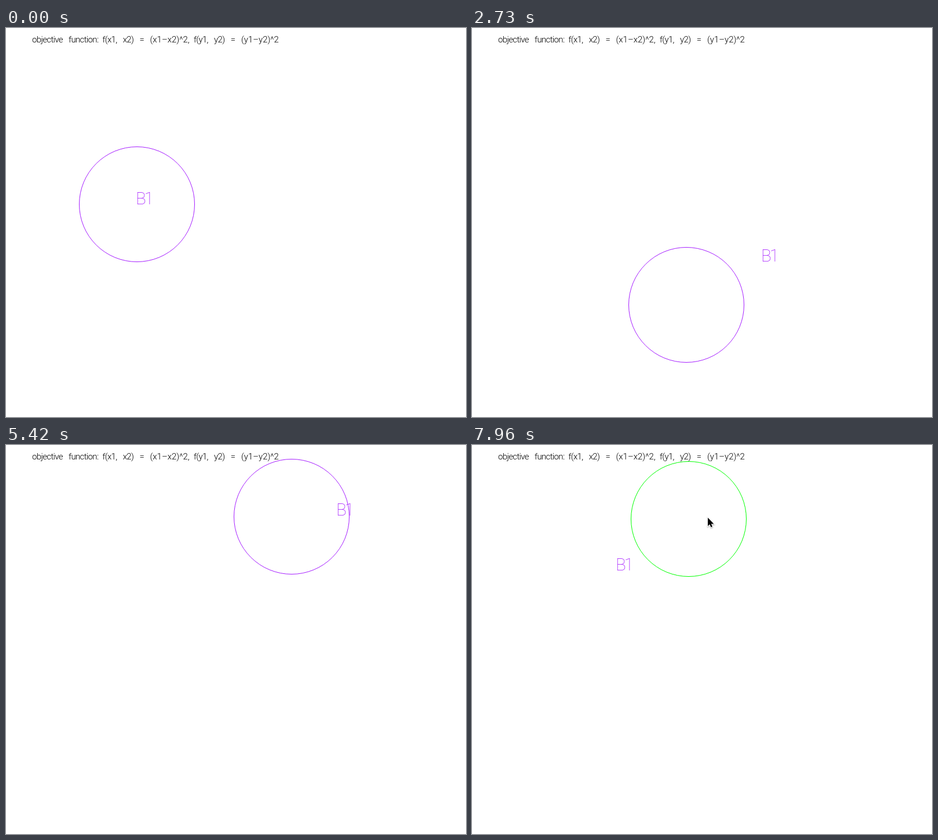
These frames come from a looping animation (794 px wide and 673 px high, 7.99 s). An HTML page with a canvas:

```html
<!DOCTYPE html>
<html lang="en">
<head>
<meta charset="utf-8">
<title>Objective function</title>
<style>
html, body { margin: 0; width: 100%; height: 100%; overflow: hidden; background: #fff; }
canvas { display: block; }
</style>
</head>
<body>
<canvas id="stage" width="794" height="673"></canvas>
<script>
const ctx = document.getElementById('stage').getContext('2d');
const LOOP = 7990, RADIUS = 99.5;
const LAG = 150; // the follower closes the gap to its leader at rate 1 / LAG
const GRAB = 6330, CURSOR_IN = 6180;
const PURPLE = '#a61eff', GREEN = '#00ff00';

// Waypoints of the follower as [time, x, y]: first the ball, after GRAB the label
const path = [
  [500, 226, 305], [700, 190, 372], [900, 142, 370], [1150, 150, 150],
  [1350, 235, -20], [1600, 539, 10], [1850, 585, 174], [2100, 583, 95],
  [2380, 310, 440], [2580, 252, 540], [2730, 369, 479], [2900, 529, 382],
  [3250, 690, 260], [3650, 740, 430], [3920, 725, 338], [4150, 673, 257],
  [4450, 415, 565], [4680, 403, 510], [4770, 440, 409], [4870, 460, 288],
  [5080, 455, 165], [5390, 480, 125], [5650, 640, 150], [5900, 600, 290],
  [6240, 462, 321], [GRAB, 462, 321], [6700, 430, 332], [7030, 355, 345],
  [7400, 225, 315], [7700, 195, 262], [7960, 249, 218], [8060, 458, 71]
];

// Velocity at a waypoint; zero next to a rest
function slope(i, axis) {
  const p = path[i], a = path[i - 1], b = path[i + 1];
  if (!a || !b || a[axis] === p[axis] || b[axis] === p[axis]) return 0;
  return (b[axis] - a[axis]) / (b[0] - a[0]);
}

// Follower from a cubic Hermite curve; leader = follower + LAG * velocity
function chase(t) {
  const i = Math.max(path.findIndex(p => p[0] > t) - 1, 0);
  const [p, q] = [path[i], path[i + 1]];
  const span = q[0] - p[0];
  const u = Math.max((t - p[0]) / span, 0), u2 = u * u, u3 = u2 * u;
  const follower = [], leader = [];
  for (const axis of [1, 2]) {
    const m = span * slope(i, axis), n = span * slope(i + 1, axis);
    const d = q[axis] - p[axis];
    const pos = p[axis] + d * (3 * u2 - 2 * u3) + m * (u3 - 2 * u2 + u) + n * (u3 - u2);
    const vel = (6 * d * (u - u2) + m * (3 * u2 - 4 * u + 1) + n * (3 * u2 - 2 * u)) / span;
    follower.push(pos);
    leader.push(pos + LAG * vel);
  }
  return { follower, leader };
}

function write(text, x, y, font, color, letter, word = 0) {
  ctx.font = font + ' Roboto, Lato, sans-serif';
  ctx.letterSpacing = letter + 'px';
  ctx.wordSpacing = word + 'px';
  ctx.fillStyle = color;
  ctx.fillText(text, x, y);
}

function drawHeading() {
  const small = (text, x, letter) => write(text, x, 25, '300 15px', '#000', letter, 7.2);
  const formula = (v, x, end) => {
    small(`f(${v}1, ${v}2) =`, x, -0.65);
    small(`(${v}1–${v}2)^2${end}`, x + 82, 0);
  };
  small('objective function:', 45, -0.65);
  formula('x', 166.5, ',');
  formula('y', 324, '');
}

function drawBall([x, y], color) {
  ctx.strokeStyle = color;
  ctx.lineWidth = 1;
  ctx.beginPath();
  ctx.arc(Math.round(x), Math.round(y), RADIUS, 0, Math.PI * 2);
  ctx.stroke();
}

function drawLabel([x, y]) {
  write('B1', Math.round(x) - 2, Math.round(y), '100 29.5px', PURPLE, -3);
}

function drawCursor(x, y) {
  const arrow = new Path2D('M0 0V14.5L3.2 11.6L5.4 16.6L7.8 15.5L5.7 10.7H10.3Z');
  ctx.save();
  ctx.translate(x, y);
  ctx.shadowColor = 'rgba(0,0,0,.35)';
  ctx.shadowBlur = 2;
  ctx.shadowOffsetY = 1;
  ctx.strokeStyle = '#fff';
  ctx.lineWidth = 2;
  ctx.stroke(arrow);
  ctx.shadowColor = 'transparent';
  ctx.fillStyle = '#000';
  ctx.fill(arrow);
  ctx.restore();
}

function draw(t) {
  const grabbed = t >= GRAB;
  const { follower, leader } = chase(t);
  const ball = grabbed ? leader : follower;
  const label = grabbed ? follower : leader;
  ctx.fillStyle = '#fff';
  ctx.fillRect(0, 0, 794, 673);
  drawHeading();
  drawBall(ball, grabbed ? GREEN : PURPLE);
  drawLabel(label);
  if (t >= CURSOR_IN) {
    const pull = Math.max(t - GRAB, 0) / (LOOP - GRAB);
    drawCursor(ball[0] + 5 + 29 * pull, ball[1] - 13 + 11 * pull);
  }
}

const start = performance.now();
function tick() {
  draw((performance.now() - start) % LOOP);
  requestAnimationFrame(tick);
}
tick();
</script>
</body>
</html>
```
